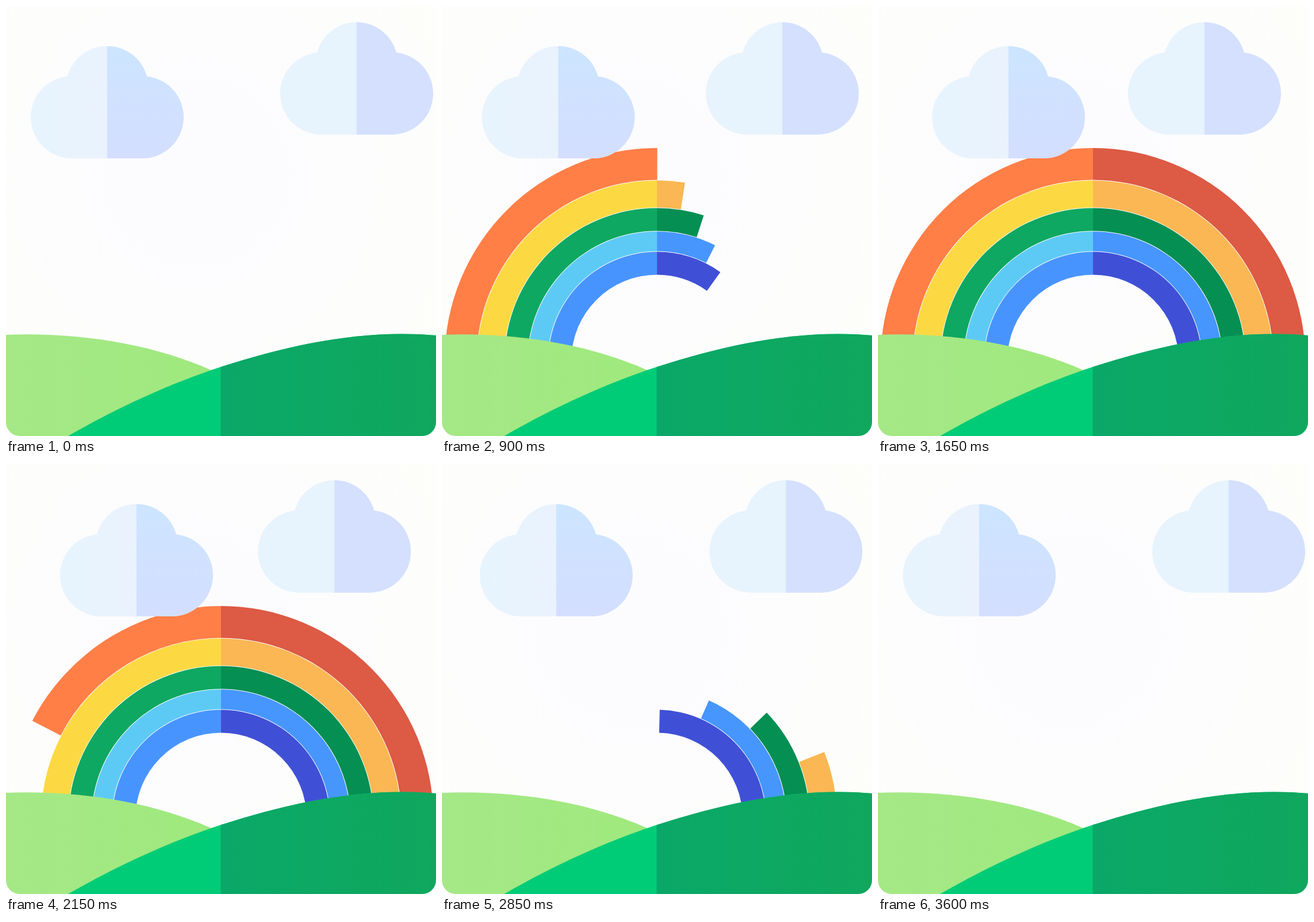
An HTML page with a canvas for the animation above (3.65 s loop, 748 by 748 pixels).

```html
<!DOCTYPE html>
<html lang="en">
<head>
<meta charset="utf-8">
<title>Rainbow</title>
<style>
  html, body { margin: 0; width: 100%; height: 100%; overflow: hidden; background: #fff; }
  canvas { display: block; border-radius: 0 0 24px 24px; }
</style>
</head>
<body>
<canvas id="stage" width="748" height="748"></canvas>
<script>
const ctx = document.getElementById('stage').getContext('2d');
const LOOP = 3650, STEP = 50;
const CX = 374, CY = 616.5;

// Outer radius, inner radius, left colour, right colour
const rings = [
  [369.5, 314, '#ff7f47', '#dd5a44'],
  [313, 266, '#fcd943', '#fbb753'],
  [265, 225.3, '#0ea862', '#058f53'],
  [224.3, 190, '#5dcaf6', '#4696fe'],
  [189, 149, '#4894ff', '#4050d6'],
];

// Cloud drift, sampled at shared times
const driftTimes = [0, 600, 1200, 1820, 2150, 2600, 3200, 3650];
const leftDrift = [0, 13, 39.5, 53.5, 51, 34, 8, 0];
const rightDrift = [0, -8, -28.8, -45, -38.7, -20.5, -2, 0];

const cloud = new Path2D('M114.5 265A71.5 71.5 0 0 1 107 122.4A71.5 71.5 0 0 1 245 122.4A71.5 71.5 0 0 1 237.5 265Z');
const lightHill = new Path2D('M0 572C130 567.3 255 588.5 356 633L400 748H0Z');
const darkHill = new Path2D('M108 748C195 698 285 657 373 628C495 589 620 562 748 573V748Z');

function gradient(x0, y0, x1, y1, from, to) {
  const g = ctx.createLinearGradient(x0, y0, x1, y1);
  g.addColorStop(0, from);
  g.addColorStop(1, to);
  return g;
}

const sky = ctx.createRadialGradient(330, 290, 150, 330, 290, 580);
sky.addColorStop(0, '#fcfcfe');
sky.addColorStop(1, '#fefefa');

const lightGreen = gradient(0, 0, 356, 0, '#a5e887', '#9fe97d');
const darkGreen = gradient(374, 0, 748, 0, '#0aa868', '#10a75d');
const paleHalf = gradient(43, 0, 176, 0, '#e7f4fe', '#e9f2fd');
const blueHalf = gradient(0, 69, 0, 265, '#cce5ff', '#d4deff');

const clamp = (v, lo, hi) => Math.min(hi, Math.max(lo, v));

// Cubic Hermite curve through the drift values, at rest at both ends
function drift(values, t) {
  const last = driftTimes.length - 1;
  const slope = i => i % last === 0 ? 0 :
    (values[i + 1] - values[i - 1]) / (driftTimes[i + 1] - driftTimes[i - 1]);
  let i = 0;
  while (i < last - 1 && t >= driftTimes[i + 1]) i++;
  const span = driftTimes[i + 1] - driftTimes[i];
  const u = (t - driftTimes[i]) / span;
  const ease = u * u * (3 - 2 * u);
  return values[i] * (1 - ease) + values[i + 1] * ease +
    span * u * (1 - u) * (slope(i) * (1 - u) - slope(i + 1) * u);
}

// Angles run in degrees from the left end over the top
function drawBand(outer, inner, from, to, color) {
  if (to <= from) return;
  const a = Math.PI * (1 + from / 180), b = Math.PI * (1 + to / 180);
  ctx.beginPath();
  ctx.arc(CX, CY, outer, a, b);
  ctx.arc(CX, CY, inner, b, a, true);
  ctx.fillStyle = color;
  ctx.fill();
}

function drawRainbow(t) {
  rings.forEach(([outer, inner, left, right], i) => {
    const head = clamp(23.1 + 0.2232 * (t - 600) + 8.9 * i, 0, 180);
    const tail = clamp(125.9 + 0.219 * (t - 2600) - 22.3 * i, 0, 180);
    drawBand(outer, inner, tail, Math.min(head, 90), left);
    drawBand(outer, inner, Math.max(tail, 90), head, right);
  });
}

// Fills a shape in two colours that meet at x = split
function fillSplit(path, split, left, right) {
  ctx.fillStyle = left;
  ctx.fill(path);
  ctx.save();
  ctx.beginPath();
  ctx.rect(split, 0, 748, 748);
  ctx.clip();
  ctx.fillStyle = right;
  ctx.fill(path);
  ctx.restore();
}

function drawCloud(x, y, left, right) {
  ctx.save();
  ctx.translate(x, y);
  fillSplit(cloud, 176, left, right);
  ctx.restore();
}

function draw(t) {
  ctx.fillStyle = sky;
  ctx.fillRect(0, 0, 748, 748);
  drawRainbow(t);
  drawCloud(drift(leftDrift, t), 0, paleHalf, blueHalf);
  drawCloud(434 + drift(rightDrift, t), -41.3, '#e7f3fd', '#d4e0fe');
  ctx.fillStyle = lightGreen;
  ctx.fill(lightHill);
  fillSplit(darkHill, 373.4, '#00cc77', darkGreen);
}

function tick() {
  const t = performance.now() % LOOP;
  draw(Math.floor(t / STEP) * STEP);
  requestAnimationFrame(tick);
}
tick();
</script>
</body>
</html>
```
